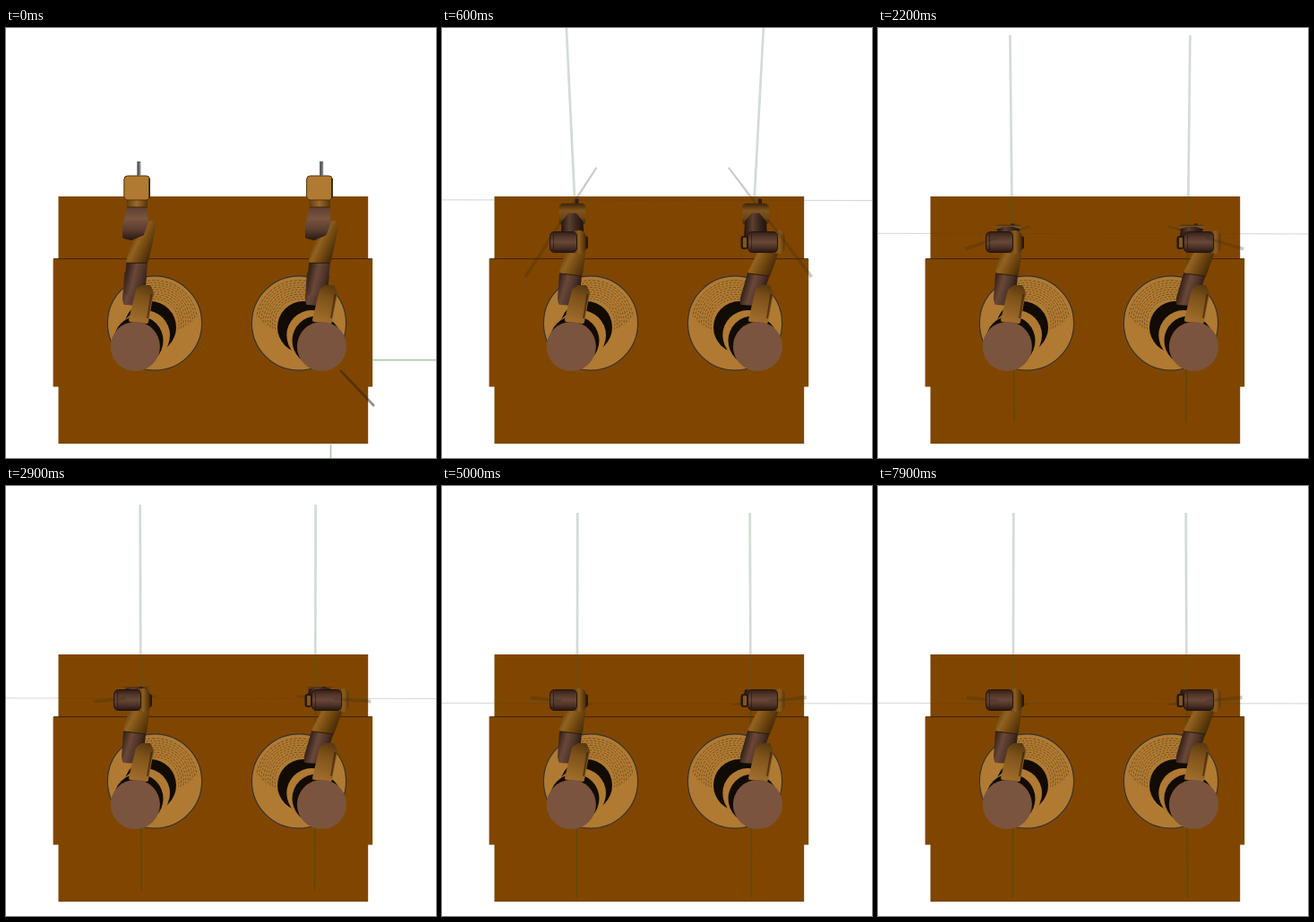
Write an HTML page with a canvas that moves like this. It is 480 px wide and 480 px high and loops after 8 s.

```html
<!DOCTYPE html>
<html lang="en">
<head>
<meta charset="utf-8">
<title>Two robot arms</title>
<style>
html, body { margin: 0; width: 100%; height: 100%; overflow: hidden; background: #fff; }
canvas { display: block; width: 480px; height: 480px; }
</style>
</head>
<body>
<canvas id="stage" width="480" height="480"></canvas>
<script>
const ctx = document.getElementById('stage').getContext('2d');
const LOOP = 8000, STEP = 100, SETTLE = 5000;
const WOOD = '#804600', TAN = '#b07a32', CAP = '#7a543e', BLACK = '#120b04', SEAM = '#2d1b08';
const TANS = ['#5c3a10', '#94621f', '#704710', '#4a2d08'];
const BROWNS = ['#38241b', '#6a4838', '#50352a', '#2a1a13'];

const UPPER = [[133, 274], [154, 277], [151, 305], [147, 308], [132, 307], [131, 302]];
const FORE = [[133, 272], [139, 252], [149, 231], [157, 230], [159, 246], [155, 275]];
const SHOULDER = [[139, 326], [144, 305], [147, 293], [152, 289], [160, 289], [163, 296], [157, 328]];

// distance of the hand axis from its final height
const gapAt = t => 74 * Math.max(0, 1 - t / SETTLE) ** 3;

const move = (points, dx) => points.map(([x, y]) => [x + dx, y]);

// the right arm leans further outward the higher it reaches
const lean = points => points.map(([x, y]) => [x + 210 + (274 - y) * 0.22, y]);

function ramp(x0, y0, x1, y1, colors) {
  const g = ctx.createLinearGradient(x0, y0, x1, y1);
  colors.forEach((c, i) => g.addColorStop(i / (colors.length - 1), c));
  return g;
}

function disc(x, y, r, fill) {
  ctx.beginPath();
  ctx.arc(x, y, r, 0, Math.PI * 2);
  ctx.fillStyle = fill;
  ctx.fill();
}

function trace(points) {
  ctx.beginPath();
  points.forEach(([x, y]) => ctx.lineTo(x, y));
  ctx.closePath();
}

// filled polygon with softened corners
function solid(points, fill, soft = 4) {
  trace(points);
  ctx.fillStyle = ctx.strokeStyle = fill;
  ctx.lineWidth = soft;
  ctx.lineJoin = 'round';
  ctx.fill();
  ctx.stroke();
}

function box(x, y, w, h, r, fill, edge) {
  ctx.beginPath();
  ctx.roundRect(x, y, w, h, r);
  ctx.fillStyle = fill;
  ctx.fill();
  if (edge) {
    ctx.strokeStyle = edge;
    ctx.lineWidth = 1;
    ctx.stroke();
  }
}

function line(x0, y0, x1, y1, width, color) {
  ctx.beginPath();
  ctx.moveTo(x0, y0);
  ctx.lineTo(x1, y1);
  ctx.lineWidth = width;
  ctx.strokeStyle = color;
  ctx.stroke();
}

// rod that thickens toward the camera, limited to the part a..b
function rod(x0, y0, x1, y1, a, b) {
  const n = Math.hypot(x1 - x0, y1 - y0), nx = (y0 - y1) / n, ny = (x1 - x0) / n;
  const at = (u, side) => {
    const w = side * (1 + u * 0.9);
    return [x0 + (x1 - x0) * u + nx * w, y0 + (y1 - y0) * u + ny * w];
  };
  trace([at(a, 1), at(b, 1), at(b, -1), at(a, -1)]);
  ctx.fillStyle = 'rgba(45,42,28,0.25)';
  ctx.fill();
}

function table() {
  ctx.fillStyle = WOOD;
  ctx.fillRect(58.5, 188, 345.7, 276);
  ctx.fillRect(52.6, 258, 356.6, 142.5);
  line(53, 257.7, 409, 257.7, 1, '#3a2000');
}

function base(right) {
  const x = right ? 327 : 166;
  disc(x, 329.5, 52.6, TAN);
  ctx.lineWidth = 1.2;
  ctx.strokeStyle = '#363330';
  ctx.stroke();
  ctx.save();
  ctx.translate(x, 329.5);
  ctx.scale(right ? -1 : 1, 1);
  ctx.lineWidth = 0.7;
  ctx.strokeStyle = 'rgba(40,24,6,0.6)';
  for (let i = 0; i < 9; i++) {
    ctx.setLineDash([2.2 + i % 3 * 0.5, 1.8]);
    ctx.beginPath();
    ctx.arc(0, 0, 27 + i * 2.6, -2.5 + i * 0.03, 0.25 - i * 0.05);
    ctx.stroke();
  }
  ctx.restore();
  disc(right ? 332 : 161, 334, 29, BLACK);
  disc(right ? 341.3 : 155, 343, 28, TAN);
  disc(right ? 347 : 148, 349, 27.5, BLACK);
}

function shoulder(dx) {
  solid(move(SHOULDER, dx), ramp(158 + dx, 288, 144 + dx, 326, ['#5a3a10', '#7d5119', '#8e5f22', '#a06c2a']));
  line(162.5 + dx, 297, 158 + dx, 324, 2, 'rgba(50,28,6,0.6)');
}

function restArm(dx) {
  solid(move(UPPER, dx + 1), ramp(130 + dx, 280, 157 + dx, 286, BROWNS));
  solid(move([[136, 264], [156, 264], [152, 300], [134, 296]], dx), ramp(133 + dx, 280, 158 + dx, 286, BROWNS));
  solid(move([[136, 260], [140, 246], [149, 228], [158, 218], [163, 217], [165, 221], [162, 238], [157, 260]], dx),
    ramp(140 + dx, 232, 165 + dx, 244, TANS));
  line(134 + dx, 262.3, 158 + dx, 262.3, 1, SEAM);
  solid(move([[137, 201], [155, 201], [157, 217], [152, 230], [140, 235], [132, 233], [132, 221]], dx),
    ramp(0, 200, 0, 238, ['#5c3f31', CAP, '#5a3d30', '#22140e']));
  box(134.5 + dx, 191, 23.5, 9, 2, ramp(134 + dx, 0, 158 + dx, 0, ['#5e3c10', '#9c6a28', '#553509']));
  line(135 + dx, 200, 158 + dx, 200, 1, '#3c240c');
  box(131.8 + dx, 165, 28.7, 27, 4, TAN, '#50320f');
  line(160 + dx, 168, 160 + dx, 190, 1.5, '#33200c');
  line(148.3 + dx, 149, 148.3 + dx, 165, 4, '#55575a');
  line(149.3 + dx, 150, 149.3 + dx, 165, 1, '#999');
}

function hand(x, gap) {
  const y = 228 - gap * 0.64, h = gap * 0.48;
  line(x + 20, y - gap * 0.1, x + 20, y + 2, 4, '#2b2118');
  box(x, y, 30, h, Math.min(5, h / 2), ramp(0, y, 0, y + h, ['#3a230b', '#80541d', '#6e4615', '#3c250a']));
  const top = y + h * 0.5, side = y + h * 0.85;
  solid([[x + 11, top], [x + 19, top], [x + 26, side], [x + 27, 232], [x + 3, 232], [x + 4, side]],
    ramp(x + 4, 0, x + 27, 0, ['#2b1b13', '#5c3f30', '#3a261d', '#20130d']), 2);
}

function elbow(right) {
  const x = right ? 341.5 : 120.5, w = right ? 33 : 30;
  box(right ? 333.5 : 155, 232, 8, 15, 3, '#281909');
  if (right) box(336, 234, 4, 11, 1, '#80571f');
  box(x + w - 6, 226, right ? 14 : 16, 26, 6, ramp(x + w - 4, 0, x + w + 9, 0, ['#5b390e', '#8d5c1d', '#503109']));
  box(x, 227.5, w, 23, 5, ramp(0, 227, 0, 251, ['#2d1c15', '#533729', '#684737', '#4b3126', '#21130d']), '#23150d');
  line(x + 4, 230, x + 4, 248, 1, 'rgba(20,10,5,0.45)');
}

function bentArm(right, gap) {
  const place = right ? lean : points => points;
  const x = right ? 340 : 131;
  hand(right ? 335 : 130.5, gap);
  solid(place(UPPER), ramp(x, 280, x + 24, 287, BROWNS));
  const fore = place(FORE);
  solid(fore, ramp(x + 5, 246, x + 33, 260, TANS));
  line(fore[0][0] - 1, 274, fore[5][0] + 1, 277, 1, SEAM);
  elbow(right);
}

function axes(gap) {
  const y = 242.6 - gap;
  const topX = 151.3 - gap * 0.3, topY = 30 - gap * 1.7;
  const botX = 150.4 + gap * 0.14, botY = 460 - gap * 1.5;
  const u = (y - topY) / (botY - topY);
  line(0, y - 0.3, 480, y + 0.3, 1, 'rgba(50,70,50,0.22)');
  for (const [x0, x1] of [[topX, botX], [495 + gap * 0.06 - topX, 495.8 - botX]]) {
    const mx = x0 + (x1 - x0) * u;
    line(x0, topY, mx, y, 2.7, 'rgba(55,95,60,0.22)');
    if (gap < 37) line(mx, y, x1, botY, 2, 'rgba(45,75,25,0.34)');
  }
}

function rods(gap, a, b) {
  const nearX = 99 - gap * 0.12, nearY = 236 + gap * 0.83;
  const farX = 167.5 + gap * 0.1, farY = 244 - gap * 1.75;
  rod(farX, farY, nearX, nearY, a, b);
  rod(492.4 - farX, farY, 505.6 - nearX, nearY, a, b);
}

function draw(t) {
  const rest = t < STEP, gap = gapAt(t);
  ctx.fillStyle = '#fff';
  ctx.fillRect(0, 0, 480, 480);
  table();
  if (rest) {
    line(409, 370.6, 480, 370.6, 1.7, '#b4c4ae');
    line(362.5, 464.5, 362.5, 480, 1.7, '#b4c4ae');
  } else {
    axes(gap);
    rods(gap, 0, 0.5);
  }
  for (const right of [false, true]) {
    base(right);
    if (rest) restArm(right ? 203.8 : 0);
    else bentArm(right, gap);
    shoulder(right ? 205 : 0);
    disc(right ? 352.5 : 144.3, 355.5, 27.6, CAP);
  }
  if (rest) line(373, 382, 411, 422, 2.6, 'rgba(40,30,15,0.5)');
  else rods(gap, 0.5, 1);
}

const start = performance.now();
function tick() {
  const t = (performance.now() - start) % LOOP;
  draw(Math.floor(t / STEP) * STEP);
  requestAnimationFrame(tick);
}
tick();
</script>
</body>
</html>
```
